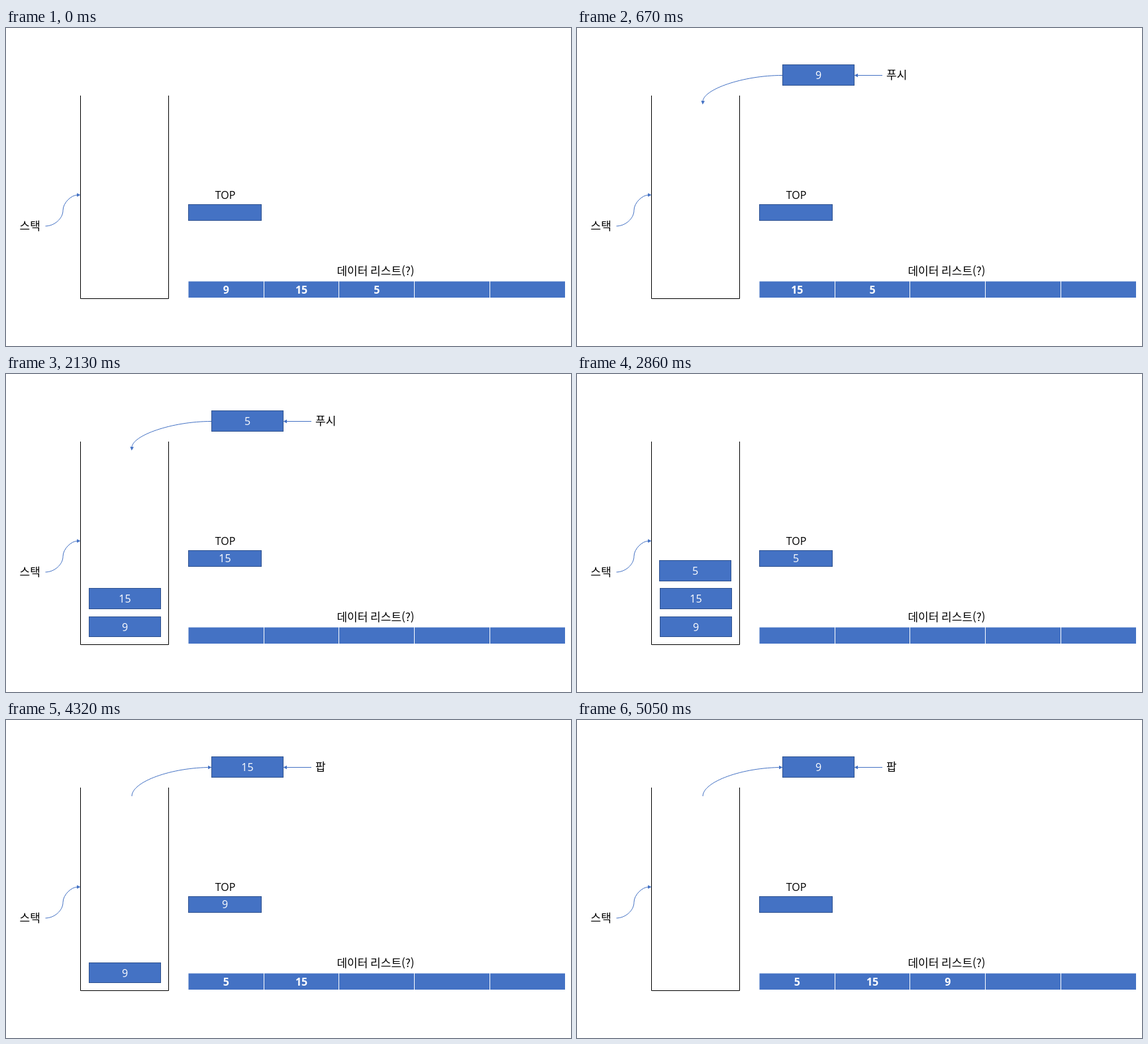
Recreate the animation shown at these times as an HTML page with a canvas. Size 853 by 480 pixels, loop 5780 ms.

```html
<!DOCTYPE html>
<html lang="ko">
<head>
<meta charset="utf-8">
<title>스택</title>
<style>
html, body { margin: 0; width: 100%; height: 100%; overflow: hidden; background: #fff; }
canvas { display: block; }
</style>
</head>
<body>
<canvas id="stage" width="853" height="480"></canvas>
<script>
const ctx = document.getElementById('stage').getContext('2d');
const FILL = '#4472c4', EDGE = '#2f528f';
const LATIN = '"Open Sans", "Noto Sans", sans-serif';
const HANGUL = '"Noto Sans CJK KR", "Noto Sans CJK", sans-serif';
const FIRST = 670, STEP = 730, LOOP = 5780;

const steps = [
  { stack: [], list: [9, 15, 5] },
  { stack: [], list: [15, 5], push: 9 },
  { stack: [9], list: [5], push: 15 },
  { stack: [9, 15], list: [], push: 5 },
  { stack: [9, 15, 5], list: [] },
  { stack: [9, 15], list: [5], pop: 5 },
  { stack: [9], list: [5, 15], pop: 15 },
  { stack: [], list: [5, 15, 9], pop: 9 }
];

// Bottom to top
const slots = [[125, 366, 31], [125, 323, 32], [124, 281, 32]];

function text(value, x, y, font, color = '#000', align = 'center') {
  ctx.font = font;
  ctx.fillStyle = color;
  ctx.textAlign = align;
  ctx.fillText(value, x, y);
}

function hangul(value, x, y, align = 'left') {
  text(value, x, y, '17px ' + HANGUL, '#000', align);
}

function box(x, y, w, h, label, baseline) {
  ctx.fillStyle = FILL;
  ctx.fillRect(x, y, w, h);
  ctx.strokeStyle = EDGE;
  ctx.lineWidth = 1;
  ctx.strokeRect(x + 0.5, y + 0.5, w - 1, h - 1);
  if (label !== undefined) text(label, x + w / 2, baseline, '16px ' + LATIN, '#fff');
}

function line(path, color) {
  ctx.strokeStyle = color;
  ctx.lineWidth = 1;
  ctx.stroke(new Path2D(path));
}

function head(x, y, angle) {
  ctx.save();
  ctx.translate(x, y);
  ctx.rotate(angle);
  ctx.fillStyle = FILL;
  ctx.fill(new Path2D('M0 0L-5.5 -2.8V2.8Z'));
  ctx.restore();
}

function drawBase() {
  ctx.fillStyle = '#fff';
  ctx.fillRect(0, 0, 853, 480);
  line('M112.5 102V408.5H245.5V102', '#000');
  line('M59.5 299C73 299 86 287.5 86 275.5S99 252 108 252', FILL);
  head(112.5, 252, 0);
  hangul('스택', 20.5, 305);
  text('TOP', 331, 258, '16px ' + LATIN);
  hangul('데이터 리스트(?)', 558, 373, 'center');
}

function drawList(items) {
  const left = 275.5, cell = 113.7;
  ctx.fillStyle = FILL;
  ctx.fillRect(left, 382.5, cell * 5, 24.5);
  for (let i = 1; i < 5; i++) {
    line(`M${Math.floor(left + i * cell) + 0.5} 382V407`, '#fff');
  }
  items.forEach((n, i) =>
    text(n, left + (i + 0.5) * cell, 401, 'bold 16px ' + LATIN, '#fff'));
}

function drawTransfer({ push, pop }) {
  const pushing = push !== undefined;
  if (!pushing && pop === undefined) return;
  line('M310 71.5C250 71.5 190 93 190 ' + (pushing ? 111 : 115), FILL);
  if (pushing) head(189.7, 115.5, Math.PI / 2 + 0.08);
  box(310, 55, 109, 32, pushing ? push : pop, 77);
  if (!pushing) head(310.5, 71.5, 0);
  line('M461 71.5H423', FILL);
  head(418.5, 71.5, Math.PI);
  hangul(pushing ? '푸시' : '팝', 467, 77);
}

function draw(step) {
  drawBase();
  box(275, 266, 111, 25, step.stack.at(-1), 284);
  step.stack.forEach((n, i) => {
    const [x, y, h] = slots[i];
    box(x, y, 109, h, n, y + 22);
  });
  drawList(step.list);
  drawTransfer(step);
}

const start = performance.now();
function frame() {
  const t = (performance.now() - start) % LOOP;
  draw(steps[t < FIRST ? 0 : 1 + Math.floor((t - FIRST) / STEP)]);
  requestAnimationFrame(frame);
}
frame();
</script>
</body>
</html>
```
